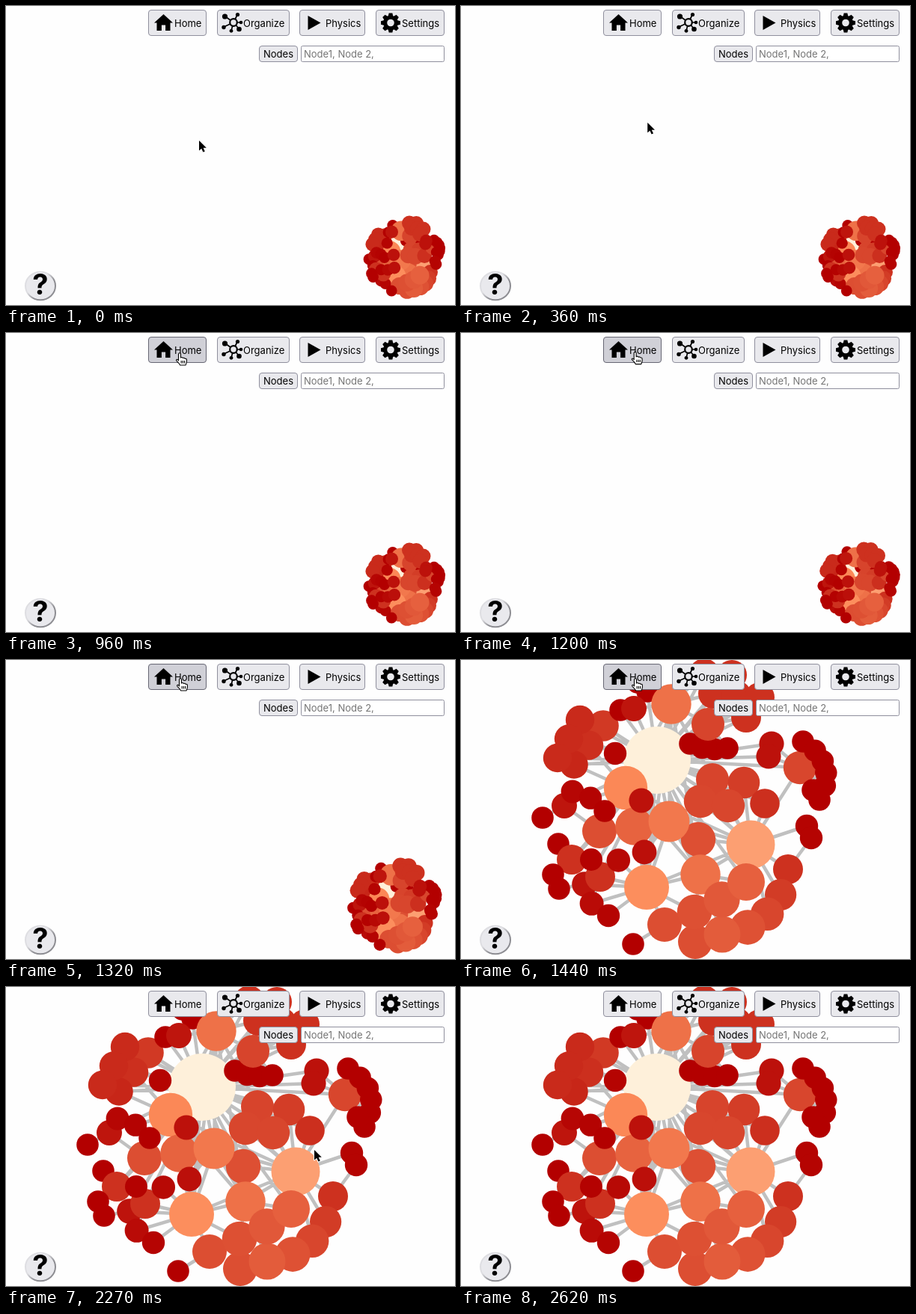
Animation of 600x400 px, one loop 3.1 s. Source, as an HTML page with a canvas:

```html
<!DOCTYPE html>
<html lang="en">
<head>
<meta charset="utf-8">
<title>Graph zoom to fit</title>
<style>
  html, body { margin: 0; width: 100%; height: 100%; overflow: hidden; background: #fefefe; }
  canvas, svg { position: absolute; left: 0; top: 0; width: 600px; height: 400px; }
  text { font: 13px Inter, sans-serif; }
  .button { fill: #e9e9ed; stroke: #8f8f9d; }
  .button.hover { fill: #d0d0d7; stroke: #676774; }
</style>
</head>
<body>
<canvas id="graph" width="600" height="400"></canvas>
<svg viewBox="0 0 600 400">
  <defs>
    <linearGradient id="rim" x1="0" y1="0" x2="1" y2="1">
      <stop offset=".4" stop-color="#dedee2"/>
      <stop offset=".62" stop-color="#8d8d92"/>
    </linearGradient>
  </defs>

  <rect id="home" class="button" x="190.5" y="5.5" width="77" height="34" rx="3.5"/>
  <rect class="button" x="282.5" y="5.5" width="96" height="34" rx="3.5"/>
  <rect class="button" x="392.5" y="5.5" width="87" height="34" rx="3.5"/>
  <rect class="button" x="494.5" y="5.5" width="91" height="34" rx="3.5"/>
  <rect class="button" x="338.5" y="53.5" width="51" height="21" rx="3.5"/>
  <rect x="394.5" y="53.5" width="191" height="21" rx="2" fill="#fff" stroke="#8f8f9d"/>

  <path transform="translate(210.5 11)" d="M0 0L12.5 11.5H9V22H2.6V14.5H-2.6V22H-9V11.5H-12.5Z"/>
  <g stroke="#000" stroke-width="1.7">
    <path d="M304 22L293 14M304 22L309 12M304 22L314 22M304 22L311 30M304 22L301 33M304 22L291 28"/>
    <circle cx="304" cy="22" r="4.8" fill="#e9e9ed" stroke-width="2.2"/>
    <g stroke="none">
      <circle cx="292.5" cy="14" r="3.6"/><circle cx="309.5" cy="11.5" r="2.6"/>
      <circle cx="314" cy="22" r="2.3"/><circle cx="311.5" cy="31" r="3.3"/>
      <circle cx="301" cy="33.3" r="2.4"/><circle cx="291" cy="28.5" r="2.7"/>
    </g>
  </g>
  <path d="M403.5 13L420.5 22.5L403.5 32Z"/>
  <g transform="translate(514 22.5)">
    <circle r="7.3" fill="none" stroke="#000" stroke-width="5"/>
    <g id="teeth"></g>
  </g>

  <text x="225" y="28">Home</text>
  <text x="317" y="28">Organize</text>
  <text x="427" y="28">Physics</text>
  <text x="529" y="28">Settings</text>
  <text x="344" y="69">Nodes</text>
  <text x="398" y="69" fill="#757575">Node1, Node 2,</text>

  <ellipse cx="46" cy="374.5" rx="20" ry="18.7" fill="#e9e9ed" stroke="url(#rim)" stroke-width="2"/>
  <text x="46" y="386" text-anchor="middle" style="font-size:38px;font-weight:700">?</text>

  <g id="cursor" stroke-linejoin="round">
    <path id="arrow" stroke="#fff" stroke-width="1.8" paint-order="stroke"
      d="M0 0V13.6L3.2 10.7L5.4 15.6L7.8 14.5L5.6 9.8H9.8Z"/>
    <path id="hand" fill="#fff" stroke="#000" stroke-width="1.1"
      d="M-1.5 10V1.2Q-1.5 -.3 0 -.3T1.5 1.2V6Q3.5 4.7 4.4 6.6Q6.2 5.6 7 7.4Q9.4 6.8 9.4 9V11.5Q9 14 8 16H.7Q-.5 13.5 -4 10.3Q-5 8.8 -3.5 8.3Q-2.5 8.3 -1.5 10ZM2.2 10V13.4M4.4 10V13.4M6.6 10V13.4"/>
  </g>
</svg>

<script>
const LOOP = 3100, TICK = 120;
const APPROACH = 360, HOVER = 960, LEAVE = 2030, GONE = 2620;
const LEAF = 14.8, WARM = 29.5, ROOT = 45;

const byId = id => document.getElementById(id);
const ctx = byId('graph').getContext('2d');
const lerp = (a, b, t) => a + (b - a) * t;
const mix = (from, to, t) => `rgb(${from.map((c, i) => Math.round(lerp(c, to[i], t)))})`;

byId('teeth').innerHTML = Array.from({ length: 8 }, (_, i) =>
  `<path transform="rotate(${i * 45})" d="M-3.4 -8.5L-2.3 -13H2.3L3.4 -8.5Z"/>`).join('');

// Node colour follows its radius: red, orange, cream.
const RED = [179, 0, 0], ORANGE = [252, 139, 89], CREAM = [254, 240, 218];
const colorFor = r => r < WARM
  ? mix(RED, ORANGE, (r - LEAF) / (WARM - LEAF))
  : mix(ORANGE, CREAM, (r - WARM) / (ROOT - WARM));

const nodes = [];
const addNode = (r, x, y) => nodes.push({ x, y, r, color: colorFor(r) });

// Evenly spaced nodes from one point to another, bowed sideways, radius changing from r0 to r1.
function addChain(count, [x0, y0], [x1, y1], r0 = LEAF, r1 = r0, bow = 0) {
  const length = Math.hypot(x1 - x0, y1 - y0);
  for (let i = 0; i < count; i++) {
    const t = i / (count - 1);
    const push = bow * 4 * t * (1 - t) / length;
    addNode(lerp(r0, r1, t),
      lerp(x0, x1, t) + (y1 - y0) * push,
      lerp(y0, y1, t) - (x1 - x0) * push);
  }
}

addNode(ROOT, 262, 134);
addNode(32.5, 387, 247);
addNode(29.2, 220, 171);
addChain(4, [306, 112], [356, 118], LEAF, LEAF, -4);
addChain(2, [236, 30], [249, 42]);
addChain(2, [281, 59], [330, 86], 26.7, 22);
addChain(2, [317, 240], [320, 287], 23.2, 26.7);
addChain(3, [185, 229], [278, 216], 23, 27.5);
addNode(30, 248, 304);
addChain(2, [272, 354], [313, 377], 23);
addChain(5, [437, 280], [349, 367], 20, 24.5, 23);
addChain(3, [312, 337], [381, 297], 23.3, 25, -4);
addChain(2, [336, 160], [378, 164], 22, 21.3);
addChain(2, [320, 189], [357, 195], 22.2);
addNode(19.8, 406, 192);

addChain(2, [325, 18], [362, 20], 20);
addChain(3, [337, 45], [399, 50], 20);
addNode(20, 381, 77);
addChain(3, [190, 88], [151, 140], 20.8, 18.8);
addChain(3, [159, 80], [129, 131], 19.2);
addChain(2, [213, 67], [231, 65], LEAF, 17);
addNode(15.2, 206, 125);
addChain(2, [109, 211], [138, 195], LEAF, 17);
addChain(3, [149, 176], [192, 202], 15.4, 14.8, 5);
addNode(16.6, 241, 188);

addNode(LEAF, 130, 246);
addChain(3, [165, 300], [197, 342], 16.8, 15.2, -8);
addChain(2, [148, 267], [186, 290], 20);
addChain(3, [174, 267], [245, 257], 15, 16.4, -6);
addChain(2, [123, 287], [131, 306]);
addNode(LEAF, 230, 380);

addNode(22.2, 453, 144);
addChain(6, [457, 109], [479, 187], LEAF, LEAF, 19);
addNode(LEAF, 470, 174);
addChain(2, [415, 112], [411, 129], 16.6);
addChain(2, [462, 222], [468, 238], 15.2);

// Each node joins the closest larger one and the hubs in reach; hubs all join each other.
const dist = (a, b) => Math.hypot(a.x - b.x, a.y - b.y);
const isHub = n => n.r > 26;
const edges = [];
nodes.forEach((node, i) => {
  const pull = n => dist(n, node) - 2 * n.r;
  const larger = nodes.filter(n => n.r > node.r + 1).sort((a, b) => pull(a) - pull(b));
  if (larger.length) edges.push([node, larger[0]]);
  nodes.forEach((hub, j) => {
    if (!isHub(hub) || j === i) return;
    const reach = hub.r ** 2 / (node.r < 16 ? 20 : 10);
    if (isHub(node) ? j < i : dist(hub, node) < reach) edges.push([node, hub]);
  });
});

function drawGraph(progress) {
  const scale = lerp(0.25, 1, progress);
  const size = Math.sqrt(scale);
  const px = x => 457.75 * (1 - progress) + x * scale;
  const py = y => 286 * (1 - progress) + y * scale;

  ctx.clearRect(0, 0, 600, 400);
  ctx.strokeStyle = '#c0c0c0';
  ctx.lineWidth = 4.5 * scale;
  ctx.beginPath();
  for (const [a, b] of edges) {
    ctx.moveTo(px(a.x), py(a.y));
    ctx.lineTo(px(b.x), py(b.y));
  }
  ctx.stroke();
  for (const { x, y, r, color } of nodes) {
    ctx.fillStyle = color;
    ctx.beginPath();
    ctx.arc(px(x), py(y), r * size, 0, Math.PI * 2);
    ctx.fill();
  }
}

const ticksSince = (now, start) => Math.floor((now - start) / TICK);

function cursorAt(now) {
  if (now >= GONE) return { shape: 'none', x: 0, y: 0 };
  if (now >= LEAVE) {
    const tick = Math.min(4, ticksSince(now, LEAVE));
    return { shape: tick ? 'arrow' : 'hand', x: lerp(245, 579, tick / 4), y: lerp(38, 398, tick / 4) };
  }
  if (now >= HOVER) {
    const t = Math.min(1, ticksSince(now, HOVER) / 3);
    return { shape: 'hand', x: lerp(232, 233, t), y: lerp(27, 25, t) };
  }
  const t = Math.max(0, ticksSince(now, APPROACH) + 1) / 5;
  return { shape: 'arrow', x: lerp(258, 230, t ** 0.72), y: lerp(180, 39, t ** 1.1) };
}

// The zoom grows steeply and lands four ticks after the pointer reaches the button.
const zoomAt = now => now < HOVER ? 0 : Math.min(1, 18 ** (ticksSince(now, HOVER) - 4));

function frame() {
  const now = performance.now() % LOOP;
  const { shape, x, y } = cursorAt(now);
  byId('cursor').setAttribute('transform', `translate(${x} ${y})`);
  for (const id of ['arrow', 'hand']) byId(id).style.display = shape === id ? '' : 'none';
  byId('home').classList.toggle('hover', shape === 'hand');
  drawGraph(zoomAt(now));
  requestAnimationFrame(frame);
}
frame();
</script>
</body>
</html>
```
